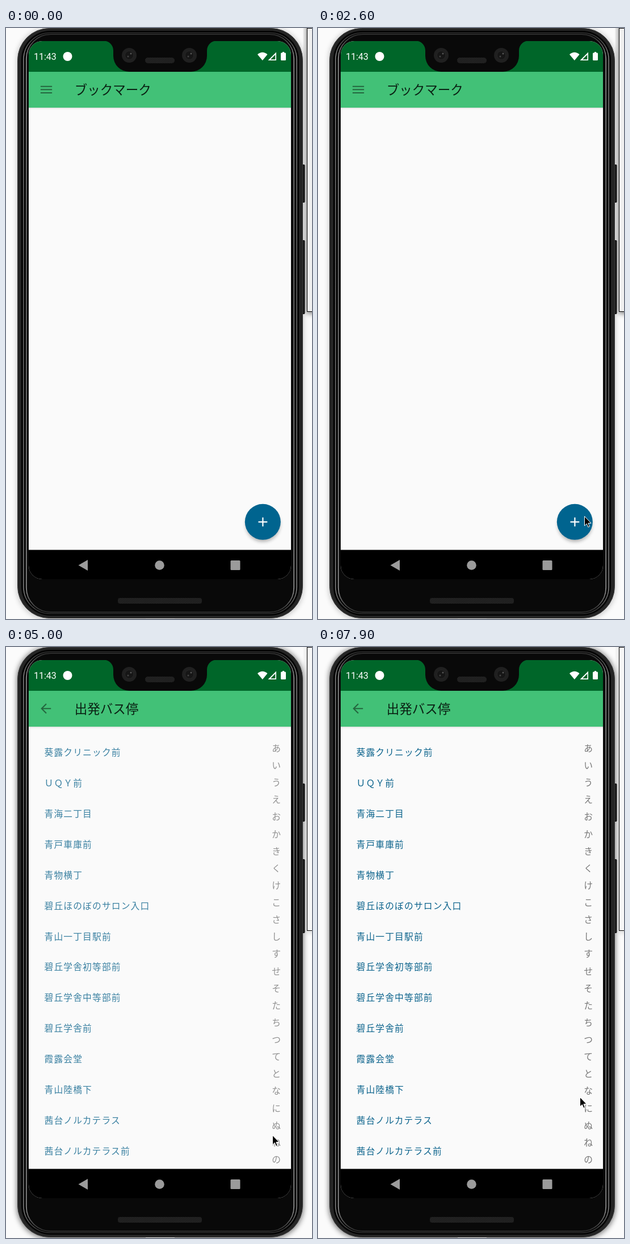
An HTML page that plays this animation: 539 px wide and 1039 px high, repeating every 8000 ms.

```html
<!DOCTYPE html>
<html lang="ja">
<head>
<meta charset="utf-8">
<title>Bus stop picker</title>
<style>
html, body { margin: 0; width: 100%; height: 100%; overflow: hidden; background: #fbfbfb; }
svg { display: block; width: 539px; height: 1039px; }
text { font-family: "Noto Sans CJK JP", "Noto Sans CJK", "Noto Sans JP", sans-serif; }
.title { font-size: 22.5px; fill: #0a2013; }
#stops { font-size: 15.75px; letter-spacing: 1.15px; fill: #0b638c; }
#kana { font-size: 15.75px; fill: #777; text-anchor: middle; }
.clock { font: 400 16px Roboto, sans-serif; fill: #fff; }
</style>
</head>
<body>
<svg viewBox="0 0 539 1039">
  <defs>
    <linearGradient id="metal" x1="0" y1="0" x2="0" y2="1">
      <stop offset="0" stop-color="#2c2c2c"/>
      <stop offset=".04" stop-color="#8c8c8c"/>
      <stop offset=".4" stop-color="#6c6c6c"/>
      <stop offset=".96" stop-color="#8a8a8a"/>
      <stop offset="1" stop-color="#2c2c2c"/>
    </linearGradient>
    <pattern id="mesh" width="3" height="3" patternUnits="userSpaceOnUse">
      <rect width="3" height="3" fill="#262626"/>
      <path d="M0 3L3 0" stroke="#151515"/>
    </pattern>
    <filter id="soft" x="-20%" y="-20%" width="140%" height="140%"><feGaussianBlur stdDeviation="5"/></filter>
    <filter id="blur" x="-40%" y="-40%" width="180%" height="180%"><feGaussianBlur stdDeviation="3"/></filter>
    <clipPath id="screen"><rect x="40" y="23" width="462" height="946" rx="24"/></clipPath>
  </defs>

  <rect width="539" height="1039" fill="#fbfbfb"/>

  <!-- side panel -->
  <rect id="panelShade" x="529" y="-10" width="30" height="512" filter="url(#soft)"/>
  <rect id="phoneShade" x="19" y="0" width="505" height="1040" rx="56" filter="url(#soft)"/>
  <rect id="panel" x="530.5" y=".5" width="20" height="498" stroke="#000"/>

  <!-- phone body -->
  <g fill="#1b1b1b" stroke="#0c0c0c">
    <rect x="519" y="240.5" width="7" height="66" rx="1"/>
    <rect x="519" y="373.5" width="7" height="129" rx="1"/>
  </g>
  <rect x="20.5" y=".5" width="502" height="1037" rx="56" fill="#252525" stroke="#383838"/>
  <rect x="28" y="6" width="487" height="1026" rx="50" fill="#111" stroke="#000" stroke-width="2"/>
  <rect x="31" y="8.5" width="481" height="1021" rx="47" fill="#000" stroke="url(#metal)" stroke-width="1.4"/>
  <rect x="35.8" y="11" width="471.4" height="1016" rx="43" fill="#090909" stroke="url(#metal)" stroke-width="1.8"/>
  <rect x="246" y="1038" width="51" height="1" fill="#e8e8e8"/>
  <rect x="197" y="1002" width="148" height="10" rx="4" fill="url(#mesh)"/>

  <!-- screen -->
  <g clip-path="url(#screen)">
    <rect x="40" y="23" width="462" height="946" fill="#fafafa"/>
    <rect x="40" y="140" width="462" height="1" fill="#d9dedb"/>
    <rect x="40" y="141" width="462" height="2" fill="#f0f1f0"/>
    <rect x="40" y="23" width="462" height="54" fill="#006629"/>
    <rect x="40" y="77" width="462" height="63" fill="#42c177"/>
    <text id="title1" class="title" x="120.7" y="117">ブックマーク</text>
    <text id="title2" class="title" x="120.7" y="117">出発バス停</text>
    <path id="menu" fill="none" stroke="#24673f" stroke-width="2.1"/>

    <g id="fab">
      <circle cx="452.5" cy="873" r="30" fill="#000" opacity=".3" filter="url(#blur)"/>
      <circle cx="452.3" cy="868.3" r="31.5" fill="#00648f"/>
      <circle id="ripple" cx="452.3" cy="868.3" r="31.5" fill="#fff"/>
      <path d="M444.5 868.3h15.8M452.4 860.4v15.8" stroke="#fff" stroke-width="2.2"/>
    </g>

    <g id="list">
      <g id="stops"></g>
      <g id="kana"></g>
    </g>

    <rect x="40" y="917.5" width="462" height="51.5" fill="#000"/>
    <g fill="#9b9b9b">
      <path d="M127.5 944.5L144 935v19z"/>
      <circle cx="270.5" cy="944.5" r="8.3"/>
      <rect x="395.5" y="936" width="17" height="17" rx="1.5"/>
    </g>

    <text class="clock" x="49" y="56">11:43</text>
    <g fill="#fff">
      <circle cx="108.5" cy="50" r="8"/>
      <path d="M443 46.5Q451.8 39 460.5 46.5L451.8 57z"/>
      <path d="M476 42.5V57H461.5z"/>
      <path d="M485.5 43.5h1.5v-1.5h3v1.5h1.5q1.5 0 1.5 1.5v10.5q0 1.5 -1.5 1.5h-6q-1.5 0 -1.5 -1.5V45q0 -1.5 1.5 -1.5z"/>
    </g>
    <path d="M474.3 47V55.3H466z" fill="#006629"/>
  </g>

  <!-- notch -->
  <path d="M172 22.5A17 17 0 0 1 189 39.500V49A28 28 0 0 0 217 77H326A28 28 0 0 0 354 49V39.500A17 17 0 0 1 371 22.500z" fill="#090909"/>
  <rect x="245" y="52" width="52" height="10" rx="5" fill="url(#mesh)"/>
  <g id="lenses"></g>

  <path id="cursor" d="M.5 .5V17L4.300 13.500L6.800 19.500L9.300 18.500L6.900 12.500H12z" fill="#000" stroke="#fff" stroke-width="1"/>
</svg>

<script>
const LOOP = 8000;
const $ = id => document.getElementById(id);
const NS = "http://www.w3.org/2000/svg";

function add(parent, tag, attrs, text) {
  const el = document.createElementNS(NS, tag);
  for (const k in attrs) el.setAttribute(k, attrs[k]);
  if (text) el.textContent = text;
  parent.appendChild(el);
}

const stops = [
  "葵露クリニック前", "ＵＱＹ前", "青海二丁目", "青戸車庫前", "青物横丁",
  "碧丘ほのぼのサロン入口", "青山一丁目駅前", "碧丘学舎初等部前", "碧丘学舎中等部前",
  "碧丘学舎前", "霞露会堂", "青山陸橋下", "茜台ノルカテラス", "茜台ノルカテラス前"
];
stops.forEach((s, i) => add($("stops"), "text", { x: 67.5, y: 191 + i * 53.92 }, s));
[..."あいうえおかきくけこさしすせそたちつてとなにぬねの"].forEach((c, i) =>
  add($("kana"), "text", { x: 476, y: 184 + i * 30.12 }, c));

for (const x of [217, 323]) {
  const g = $("lenses");
  add(g, "circle", { cx: x, cy: 48, r: 13, fill: "#202020" });
  add(g, "circle", { cx: x, cy: 48, r: 7.5, fill: "#161616", stroke: "#262626" });
  add(g, "circle", { cx: x + 3, cy: 45, r: 1.5, fill: "#555" });
  add(g, "circle", { cx: x - 2, cy: 50, r: 1.5, fill: "#444" });
}

// Pointer stops: time, x, y
const path = [
  [500, 54, 967], [600, 220, 961], [700, 365, 953], [800, 404, 948], [900, 356, 943],
  [1200, 356, 943], [1300, 359, 935], [1700, 383, 905], [2100, 410, 874],
  [2200, 424, 870], [2400, 455, 861], [2600, 469, 858],
  [5700, 469, 858], [5800, 469.5, 857.5], [6200, 473.5, 842], [6500, 470, 829],
  [6600, 470, 829], [6700, 470, 828], [7700, 470, 828], [7800, 464, 803], [7900, 461, 791]
];

// Piecewise linear value(s) at time t
function at(keys, t) {
  const i = keys.findIndex(k => k[0] > t);
  if (i < 0) return keys[keys.length - 1].slice(1);
  if (i === 0) return keys[0].slice(1);
  const a = keys[i - 1], b = keys[i], u = (t - a[0]) / (b[0] - a[0]);
  return a.slice(1).map((v, j) => v + (b[j + 1] - v) * u);
}

const morph = [[3800, 0], [3900, .03], [4000, .08], [4500, .08], [4600, .5], [4700, .95], [4800, .95], [4900, 1]];
const fabFade = [[3800, 1], [3900, .5], [4000, 0]];
const listFade = [[4800, 0], [4900, .3], [5000, .8], [5100, 1]];

// Menu bars (p = 0) turning into a back arrow (p = 1)
function drawMenu(p) {
  const mix = (a, b) => a + (b - a) * p;
  const head = mix(18, 11.3), shaft = mix(18, 16), angle = mix(0, Math.PI / 4);
  const cut = mix(0, .7), gap = mix(5, -.7), left = -shaft / 2;
  const dx = head * Math.cos(angle), dy = head * Math.sin(angle), k = 1.125;
  const line = (x, y, w, h) => `M${x * k} ${y * k}l${w * k} ${h * k}`;
  $("menu").setAttribute("d",
    line(left + cut, 0, shaft - 2 * cut, 0) + line(left, gap, dx, dy) + line(left, -gap, dx, -dy));
  $("menu").setAttribute("transform", `translate(71 108.3) rotate(${mix(-180, 0)})`);
}

function draw(ms) {
  const t = Math.floor(ms / 100) * 100;
  const set = (id, v) => $(id).setAttribute("opacity", v);

  const [x, y] = at(path, t);
  $("cursor").setAttribute("transform", `translate(${x} ${y})`);
  set("cursor", t >= 500 ? 1 : 0);

  const focused = t >= 3400;
  set("phoneShade", focused ? .5 : .2);
  set("panelShade", focused ? .15 : .5);
  $("panel").setAttribute("fill", focused ? "#f7f7f7" : "#f0f0f0");

  set("fab", at(fabFade, t)[0]);
  set("ripple", t >= 3800 ? .15 : 0);
  set("title1", t < 3900 ? 1 : 0);
  set("title2", t < 3900 ? 0 : 1);
  drawMenu(at(morph, t)[0]);
  set("list", at(listFade, t)[0]);
}

const start = performance.now();
function tick() {
  draw((performance.now() - start) % LOOP);
  requestAnimationFrame(tick);
}
draw(0);
requestAnimationFrame(tick);
</script>
</body>
</html>
```
